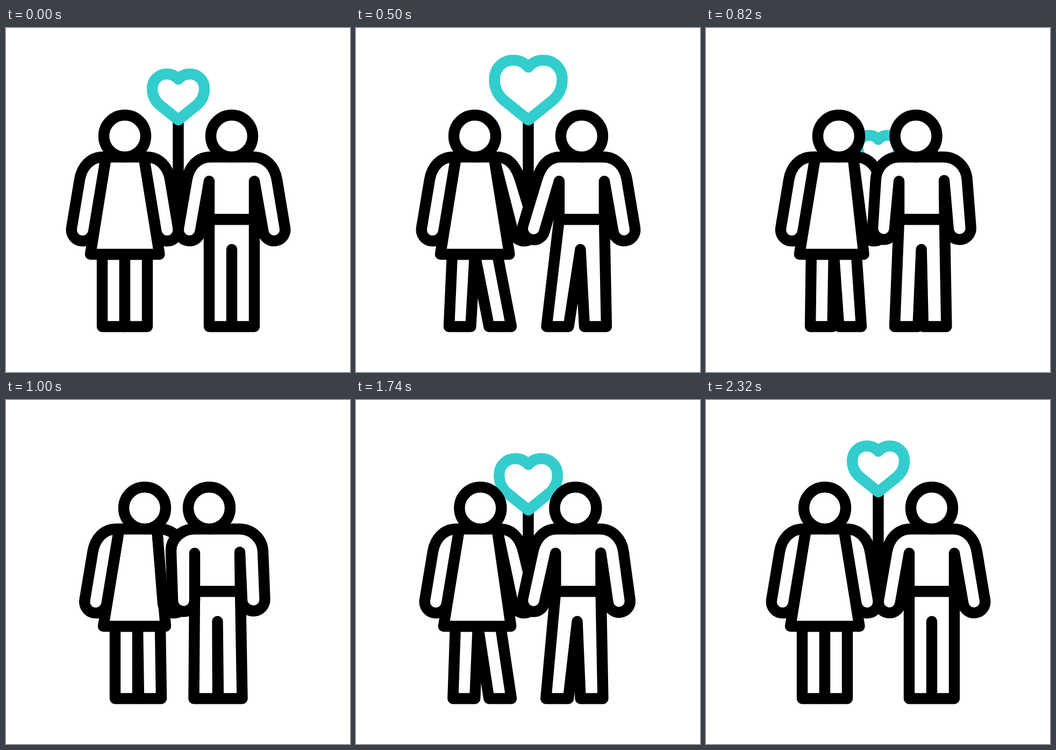
Write an HTML page with a canvas that moves like this. It is 640 px wide and 640 px high and loops after 2.4 s.

```html
<!DOCTYPE html>
<html lang="en">
<head>
<meta charset="utf-8">
<title>Couple with heart balloon</title>
<style>
  html, body { margin: 0; width: 100%; height: 100%; overflow: hidden; background: #fff; }
  canvas { display: block; width: 640px; height: 640px; }
</style>
</head>
<body>
<canvas id="stage" width="640" height="640"></canvas>
<script>
const ctx = document.getElementById('stage').getContext('2d');
const LOOP = 2400, STEP = 20;
const BLACK = '#000', TEAL = '#33cdcd', WHITE = '#fff';
const MID = 320.6;

// step: feet and inner hands move; join: bodies slide together; lean: heads tilt in
let step = 0, join = 0, lean = 0;

function ease(t, from, to) {
  const p = Math.min(1, Math.max(0, (t - from) / (to - from)));
  return p * p * (3 - 2 * p);
}

// A point at rest, plus its shifts for the step and for the join
const pt = (x, y, stepX = 0, joinX = 0, stepY = 0, joinY = 0) =>
  [x + stepX * step + joinX * join, y + stepY * step + joinY * join];

function paint(fill = WHITE, stroke = BLACK) {
  if (fill) {
    ctx.fillStyle = fill;
    ctx.fill();
  }
  ctx.strokeStyle = stroke;
  ctx.stroke();
}

function polygon(points) {
  ctx.beginPath();
  points.forEach(p => ctx.lineTo(...p));
  ctx.closePath();
  paint();
}

function head(x) {
  ctx.beginPath();
  ctx.arc(x, 201, 39, 0, Math.PI * 2);
  paint();
}

// side is 1 when the body lies to the right of the arm, -1 otherwise
function shoulderControls(shoulder, outer, side) {
  const [x, y] = shoulder;
  return {
    start: [x + 44 * side, 240],
    top: [x + 20 * side, 240],
    low: [x + (x - outer[0]) * 0.27, y - 24]
  };
}

function hand(from, to, anticlockwise) {
  const cx = (from[0] + to[0]) / 2, cy = (from[1] + to[1]) / 2;
  const angle = p => Math.atan2(p[1] - cy, p[0] - cx);
  const r = Math.hypot(from[0] - cx, from[1] - cy);
  ctx.arc(cx, cy, r, angle(from), angle(to), anticlockwise);
}

function armDown({ shoulder, outer, inner }, side) {
  const c = shoulderControls(shoulder, outer, side);
  ctx.lineTo(...c.start);
  ctx.bezierCurveTo(...c.top, ...c.low, ...shoulder);
  ctx.lineTo(...outer);
  hand(outer, inner, side > 0);
}

function armUp({ shoulder, outer, inner }, side) {
  const c = shoulderControls(shoulder, outer, side);
  ctx.lineTo(...inner);
  hand(inner, outer, side < 0);
  ctx.lineTo(...shoulder);
  ctx.bezierCurveTo(...c.low, ...c.top, ...c.start);
}

function sleeve(neck, arm, side) {
  ctx.beginPath();
  ctx.moveTo(...neck);
  armDown(arm, side);
  ctx.closePath();
  paint();
}

function drawBalloon() {
  const scale = 1 + 0.3 * step - 0.73 * join;
  const tip = 171 + 137 * join;

  ctx.beginPath();
  ctx.moveTo(MID - 0.1, tip);
  ctx.lineTo(MID - 0.1, 375);
  paint(null);

  const at = (x, y) => [MID + x * scale, tip + y * scale];
  const curve = (side, ...c) => ctx.bezierCurveTo(
    ...at(side * c[0], c[1]), ...at(side * c[2], c[3]), ...at(side * c[4], c[5]));
  ctx.beginPath();
  ctx.moveTo(...at(0, 0));
  ctx.lineTo(...at(-33.5, -27));
  curve(-1, 43.5, -35, 48.5, -46, 48.5, -58);
  curve(-1, 48.5, -74, 36.5, -85.5, 21.5, -85.5);
  curve(-1, 13.5, -85.5, 5.5, -82, 0, -75.5);
  curve(1, 5.5, -82, 13.5, -85.5, 21.5, -85.5);
  curve(1, 36.5, -85.5, 48.5, -74, 48.5, -58);
  curve(1, 48.5, -46, 43.5, -35, 33.5, -27);
  ctx.closePath();
  paint(null, TEAL);
}

function drawWoman() {
  polygon([pt(179, 421, 0, 24), pt(179, 555.5, -6, 30),
           pt(221, 555.5, -7.5, 31.5), pt(221, 421, 0, 24)]);
  polygon([pt(221, 421, 0, 24), pt(221, 555.5, 26.5, -0.5),
           pt(263, 555.5, 26, 0), pt(263, 421, 0, 24)]);

  const neckL = pt(186, 240, 0, 24.5), neckR = pt(256.5, 240, 0, 24.5);
  polygon([neckL, neckR, pt(285.5, 421, 0, 11.5), pt(157, 421, 0, 24)]);

  sleeve(neckL, {
    shoulder: pt(137, 282, 0, 24.5),
    outer: pt(122, 372, 0, 24.5),
    inner: pt(163, 379, 0, 24.5)
  }, 1);
  sleeve(neckR, {
    shoulder: pt(305.4, 282, 0, 24),
    outer: pt(320.4, 372, 12.6),
    inner: pt(279.4, 379, 12.6)
  }, -1);

  head(221 + 37 * join + lean);
}

function drawMan() {
  const waistL = pt(378, 356, 0, -27), waistR = pt(462, 356, 0, -26);

  polygon([waistL, pt(378, 555.5, -23.5, -5), pt(420, 555.5, -24.5, -1.5),
           pt(420, 412, -2.5, -24), pt(420, 555.5, 5, -30),
           pt(462, 555.5, 4, -26.5), waistR]);

  ctx.beginPath();
  ctx.moveTo(...pt(378, 285, 0, -27));
  armUp({
    shoulder: pt(336.5, 282, 0, -29.5),
    outer: pt(321, 372, -10.5, -0.5, -4, 4.5),
    inner: pt(361.5, 379, -11, 0.5, -0.5, -5)
  }, 1);
  armDown({
    shoulder: pt(504, 282, 0, -26),
    outer: pt(519, 372, 0, -37.5, 0, -1.5),
    inner: pt(478.5, 379, 0, -39.5, 0, -7)
  }, -1);
  ctx.lineTo(...pt(462, 285, 0, -27, 0, -2));
  ctx.lineTo(...waistR);
  ctx.lineTo(...waistL);
  ctx.closePath();
  paint();

  head(420 - 42 * join - lean);
}

function render(t) {
  step = ease(t, 0, 420) - ease(t, 1905, 2320);
  join = ease(t, 495, 1005) - ease(t, 1395, 1905);
  lean = 5.2 * join * ease(t, 1005, 1395);

  ctx.fillStyle = WHITE;
  ctx.fillRect(0, 0, 640, 640);
  ctx.lineWidth = 20.4;
  ctx.lineCap = ctx.lineJoin = 'round';
  drawBalloon();
  drawWoman();
  drawMan();
}

const start = performance.now();
function tick() {
  const t = (performance.now() - start) % LOOP;
  render(Math.floor(t / STEP) * STEP);
  requestAnimationFrame(tick);
}
tick();
</script>
</body>
</html>
```
